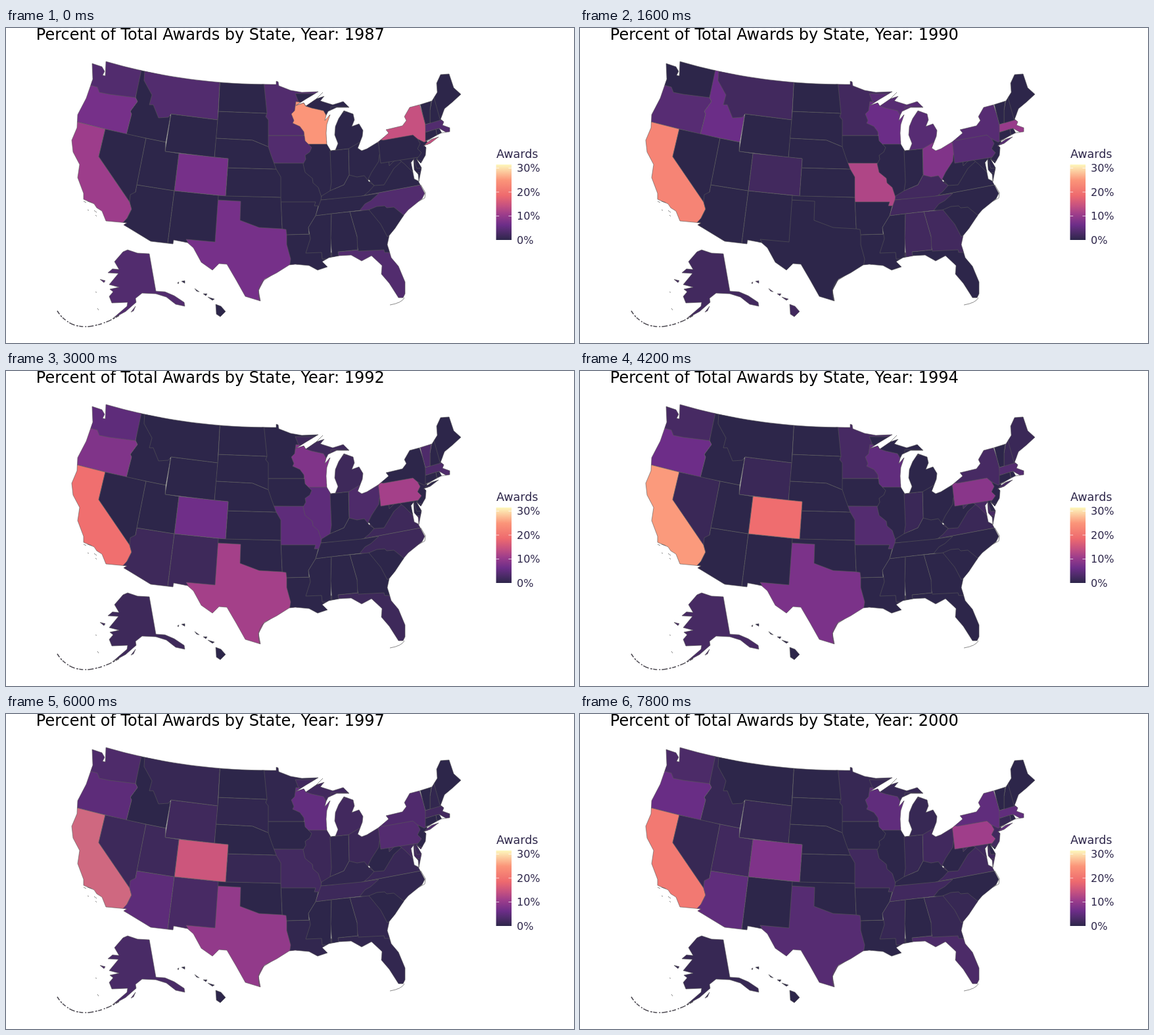
Write an HTML page that moves like this. It is 864 px wide and 480 px high and loops after 8000 ms.

```html
<!DOCTYPE html>
<html lang="en">
<head>
<meta charset="utf-8">
<title>Percent of Total Awards by State</title>
<style>
html, body { margin: 0; width: 100%; height: 100%; overflow: hidden; background: #fff; }
svg { display: block; width: 864px; height: 480px; font-family: "DejaVu Sans", sans-serif; }
.land path, #shore { stroke: #595959; stroke-width: .6; stroke-linejoin: round; }
#shore, #coast, #chain { fill: none; }
#coast { stroke: #595959; stroke-width: .7; }
#chain { stroke: #4d4a52; stroke-width: 1.5; stroke-dasharray: 6 1.5 3 2.5 9 2 2 3; }
#legend text { fill: #2d264a; font-size: 16px; }
</style>
</head>
<body>
<svg viewBox="0 0 864 480">
  <defs>
    <linearGradient id="ramp" x1="0" y1="1" x2="0" y2="0"></linearGradient>
    <clipPath id="inside"><path id="mainland"/></clipPath>
  </defs>
  <text id="title" x="45.8" y="18" font-size="24"></text>
  <g id="states" class="land" clip-path="url(#inside)"></g>
  <g id="islands" class="land"></g>
  <use id="shore" href="#mainland"/>
  <path id="chain" d="M172,438Q150,452 125,455Q104,456 92,446Q84,441 78,431"/>
  <path id="coast" d="M631,239L638,251L637,259L628,264M606,411Q602,419 584,422M386,416Q381,398 390,386L402,378M118,264l4,2m2,-2l6,2m-6,11l2,1m8,0l4,3m-2,4l2,2M470,110l12,-12M139,427l2,3M136,402l2,1"/>
  <g id="legend">
    <text x="746" y="198" style="font-size:17.5px">Awards</text>
    <rect x="745.5" y="208" width="23.5" height="115" fill="url(#ramp)"/>
  </g>
</svg>
<script>
// Coastline of the mainland, clockwise from the north-west corner.
const north = 'M131,54 146,59 150,66 147,72 151,73 152,51Q275,87 411,86L411,81 414,82 415,88 433,95 450,98 475,97 455,109 441,118 453,114 456,119 472,108 484,104 478,111 497,117 513,112 522,121 503,121 490,127 487,133 485,141 493,132 488,147 487,160 488,177 494,187 501,186 505,176 500,163 501,150 506,138 514,126 528,131 530,140 526,150 537,146 543,156 542,165 535,183 541,187 549,184 567,173';
const east = ' 582,160 578,155 603,149 609,141 606,135 614,121 629,117 648,111 651,106 656,98 655,84 661,71 674,70 681,91 692,101 679,113 667,123 661,139 666,143 664,148 675,152 675,158 662,160 656,163 640,172 658,166 645,176 636,179 639,182 638,194 631,206 624,199 632,213 628,234 627,223 621,216 620,200 616,205 619,220 621,230 627,233 637,252 633,260 612,277 606,284 592,305 583,316 580,330 586,350 597,363 607,387 607,405 604,411 597,411';
const south = ' 583,389 571,375 572,362 556,347 541,355 525,346 507,347 491,350 481,356 489,364 474,369 461,362 440,360 431,361 412,373 393,383 384,400 387,416 364,409 350,384 336,360 324,359 314,369 297,357 285,335 276,327 255,323 254,329 220,325';
const west = ' 179,300 184,297 152,294 146,279 138,274 134,268 118,261 118,252 109,228 112,208 102,189 100,171 108,152 109,132 122,107 132,78Z';

// Painted in this order: each state covers the ones before it, and the coast clips them all.
const shapes = {
  ID: '205,50 230,50 250,135 243,174 183,162 191,131 189,127 200,112 197,106',
  MN: '388,70 480,70 480,125 453,164 398,164',
  IA: '395,164 470,164 470,207 400,206',
  MO: '404,206 452,206 480,215 485,265 475,272 460,272 418,266',
  IL: '460,177 465,182 462,189 455,194 456,200 452,207 455,220 466,229 467,236 475,243 480,258 500,250 500,170',
  MI: '440,100 530,100 530,124 490,135 450,125/494,120 550,120 548,175 534,183 494,187',
  WI: '441,112 453,114 456,119 465,122 483,126 487,133 500,130 490,177 460,177 455,172 453,158 447,150 436,145 438,141 434,131 439,126',
  OH: '521,184 545,170 575,160 570,206 551,232 522,226',
  IN: '493,187 521,184 522,224 514,239 493,248 495,235',
  VA: '541,256 631,239 640,225 620,200 600,200 552,235',
  KY: '479,262 480,256 493,248 514,239 522,224 534,227 545,225 553,235 560,240 552,249 541,258',
  WV: '568,193 567,203 556,220 551,230 560,240 575,239 590,214 602,203 600,195',
  MD: '582,200 583,210 590,203 597,200 606,207 619,220 634,221 634,195',
  DE: '620,198 625,214 640,213 630,195',
  NJ: '622,168 640,172 645,185 640,205 626,201',
  NY: '565,175 575,140 605,110 629,117 634,132 638,147 640,172 636,174 626,169/635,180 641,174 660,162 660,170',
  PA: '566,170 574,171 619,163 626,169 630,176 626,184 632,190 627,197 570,206',
  NH: '648,108 656,104 668,142 645,146 645,125',
  VT: '629,112 648,105 645,125 645,145 638,147 634,132',
  ME: '651,106 645,60 700,60 700,115 661,142',
  MA: '638,147 662,140 680,140 680,165 659,153 638,159',
  CT: '638,159 654,154 656,165 638,172',
  RI: '654,154 659,153 664,162 656,166',
  NC: '538,278 541,256 631,239 645,245 645,270 606,290 590,280',
  FL: '505,341 535,338 590,335 620,420 560,420 500,350',
  GA: '523,280 552,277 600,310 585,342 576,342 575,338 536,340 533,328 534,318',
  SC: '552,277 564,272 576,271 579,274 590,273 606,286 605,300 580,318 570,299',
  TX: '322,262 357,262 426,305 445,365 387,425 300,400 270,322',
  LA: '427,315 465,314 480,335 500,345 500,375 431,365 433,352 427,330',
  AR: '418,265 471,265 469,271 475,271 471,286 460,304 461,314 427,315 426,307 420,306',
  TN: '479,262 541,256 567,252 555,263 546,268 538,278 471,286 475,273',
  MS: '471,286 495,283 494,352 481,352 480,342 456,343 463,321 460,304',
  AL: '495,283 523,280 534,318 535,338 505,341 507,352 496,352 494,320',
  OK: '322,255 418,258 420,306 385,304 356,293 357,264 322,262',
  KS: '337,213 411,215 418,227 418,258 334,256',
  SD: '323,127 397,130 395,135 399,140 399,181 375,171 319,168',
  NE: '319,168 375,171 399,181 404,196 411,215 337,213 338,199 317,197',
  ND: '326,70 391,70 397,130 323,127',
  MT: '212,50 326,70 322,140 251,131 247,136 232,137 224,117 218,117 222,102 210,80',
  WY: '251,131 322,140 317,197 242,188',
  NM: '256,248 323,255 318,326 274,322 277,327 245,335',
  CO: '263,191 338,199 334,256 256,248',
  OR: '100,80 150,80 197,106 200,112 189,127 191,131 183,162 100,141',
  WA: '120,40 210,45 197,106 157,101 142,98 139,90 120,85',
  CA: '100,141 151,154 141,196 188,265 191,276 184,290 184,310 90,300',
  NV: '151,154 213,168 197,250 188,265 141,196',
  AZ: '199,239 256,248 245,335 170,305 184,290 191,276 188,265 189,254 197,250',
  UT: '213,168 243,174 242,188 263,191 256,248 199,239'
};
const islands = {
  AK: '185,338 200,343 218,344 228,401 242,402 256,408 271,418 272,424 258,421 244,410 228,405 207,404 197,412 198,418 182,432 162,443 184,424 185,418 161,419 157,409 163,402 158,398 172,395 157,391 171,374 155,373 162,367 172,368 165,356 178,341/143,383 151,385 149,388/190,433 197,424 194,431',
  HI: '261,388 263,387 262,390/267,386 272,385 272,389/287,397 294,402 290,401/300,405 306,405 304,408/307,410 317,413 314,415/319,421 327,424 334,432 326,440 320,436'
};

// Awards won per state: a count, then the states that reached it.
const awards = [
  [1987, '7 WI 4 NY 3 CA 2 OR TX CO 1 MN IA MT WA AK NC FL MA'],
  [1989.5, '11 CA 6 MO 5 MA 4 OH 3 ID WI 2 OR MI PA NY 1 MT MN CO KY TN AL GA AK HI'],
  [1992, '12 CA 7 TX PA 5 OR WI 4 CO 3 WA IL MO 2 OH VT MA 1 AK AZ NM VA NC FL MI'],
  [1994, '20 CA 15 CO 7 PA 6 TX 5 OR 4 WI 3 MO MA 2 WA MN NY MD AK 1 NV WY IN ME VA NH'],
  [1996, '20 CA 14 CO 9 TX 4 WI PA 3 WA OR AZ WY AK 2 UT NM MO VA 1 NV MI IN TN GA NY MA MD DE'],
  [1998, '14 CO 12 CA 9 TX 6 OR AZ NY WI 3 WA NM MD IL OH PA MA MI 2 AK DE NV KS MT MO TN 1 UT SD MN KY NC FL LA NH'],
  [2000, '21 CA 11 PA 8 CO 6 OR 5 WI NY MA AZ 4 TX 3 FL WA 2 UT OH MO TN VA MD NJ 1 ID NV WY MN IN MI MS GA SC CT AK']
].map(([year, line]) => ({ year, share: shares(line) }));

function shares(line) {
  const share = {};
  let count = 0, total = 0;
  for (const word of line.split(' ')) {
    if (+word) count = +word;
    else total += share[word] = count;
  }
  for (const id in share) share[id] *= 100 / total;
  return share;
}

const maxShare = 31.5;
const stops = [
  [0, '2d264a'], [3.6, '522c6e'], [6.2, '6c2d88'], [10.7, '9d3d8b'], [14.3, 'c65180'],
  [18.6, 'ee6a6e'], [25, 'fb9579'], [maxShare, 'fdf8bd']
].map(([v, hex]) => [v, [0, 2, 4].map(i => parseInt(hex.slice(i, i + 2), 16))]);

const mix = (a, b, k) => a.map((c, i) => c + (b[i] - c) * k);
const css = rgb => `rgb(${rgb.map(Math.round)})`;

function shade(v = 0) {
  const i = Math.max(1, stops.findIndex(s => s[0] >= v));
  const [a, from] = stops[i - 1], [b, to] = stops[i];
  return mix(from, to, (v - a) / (b - a));
}

function add(parent, tag, attrs, text = '') {
  const el = document.createElementNS('http://www.w3.org/2000/svg', tag);
  for (const k in attrs) el.setAttribute(k, attrs[k]);
  el.textContent = text;
  return document.getElementById(parent).appendChild(el);
}

const paths = {};
function addStates(parent, outlines) {
  for (const id in outlines) {
    const d = outlines[id].split('/').map(ring => `M${ring}Z`).join('');
    paths[id] = add(parent, 'path', { d });
  }
}
document.getElementById('mainland').setAttribute('d', north + east + south + west);
addStates('states', shapes);
addStates('islands', islands);

for (const [v, rgb] of stops) add('ramp', 'stop', { offset: v / maxShare, 'stop-color': css(rgb) });
for (const v of [0, 10, 20, 30]) {
  const y = 323 - v * 3.65;
  add('legend', 'text', { x: 777, y: y + 5.8 }, v + '%');
  if (v) add('legend', 'path', { d: `M745.5,${y}h4.6M764.4,${y}h4.6`, stroke: '#fff', 'stroke-width': .7 });
}

// A year rests for two ticks and spends a third halfway to the next; the first change takes three.
function yearAt(tick) {
  if (tick < 3) return 1987 + tick / 3;
  const n = tick - 3;
  return 1988 + Math.floor(n / 3) + (n % 3 === 2 ? .5 : 0);
}

const title = document.getElementById('title');
let shown = -1;

function draw(now) {
  const tick = Math.floor(now % 8000 / 200);
  if (tick === shown) return;
  shown = tick;
  const year = yearAt(tick);
  const next = Math.max(1, awards.findIndex(a => a.year >= year));
  const from = awards[next - 1], to = awards[next];
  const k = (year - from.year) / (to.year - from.year);
  for (const id in paths) {
    paths[id].setAttribute('fill', css(mix(shade(from.share[id]), shade(to.share[id]), k)));
  }
  title.textContent = `Percent of Total Awards by State, Year: ${Math.round(year)}`;
}

const start = performance.now();
function loop() {
  draw(performance.now() - start);
  requestAnimationFrame(loop);
}
loop();
</script>
</body>
</html>
```
